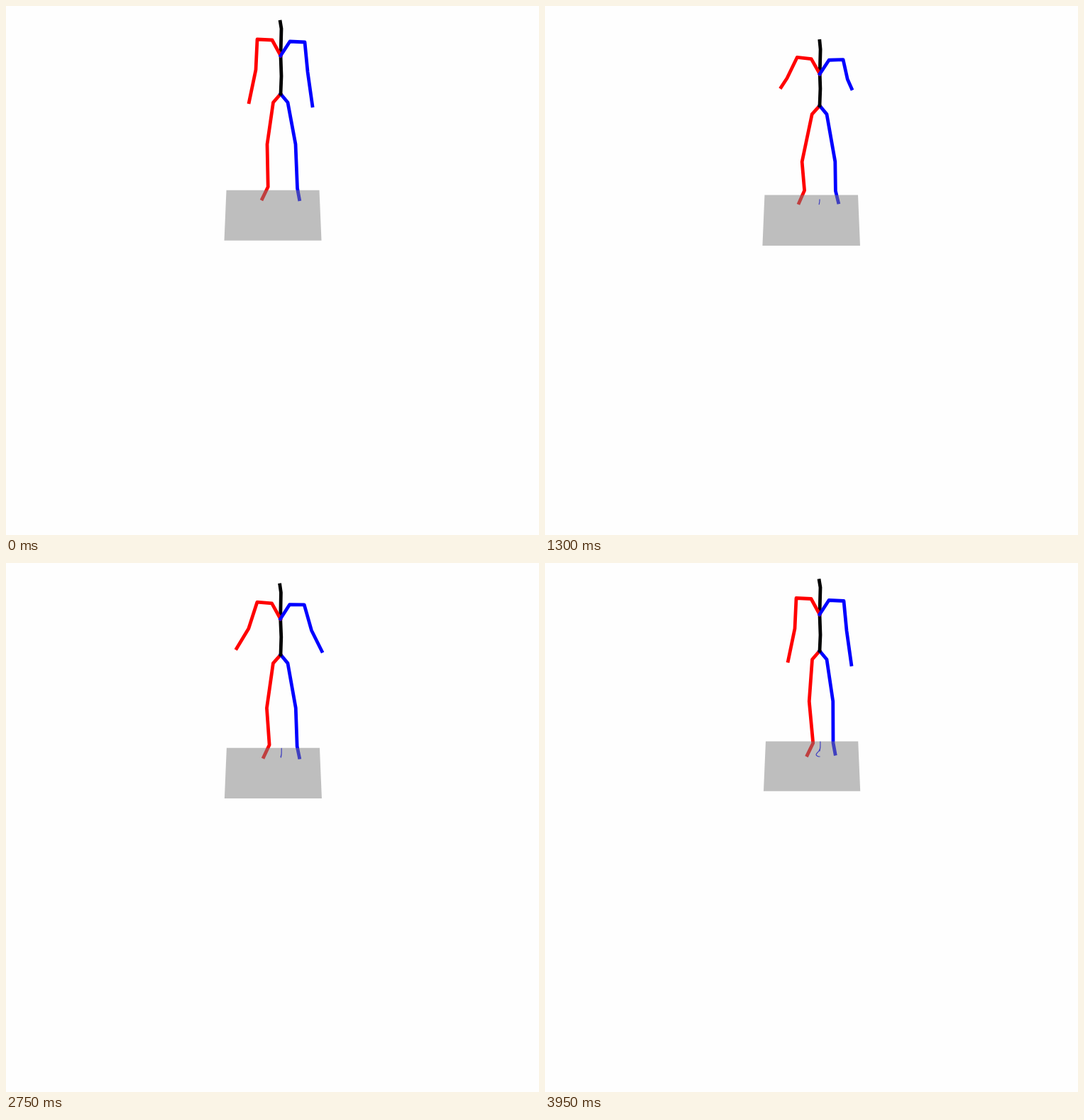
Animation of 751x746 px, one loop 4 s. Source, as an HTML page with a canvas:

```html
<!DOCTYPE html>
<html lang="en">
<head>
<meta charset="utf-8">
<title>Stick figure squat</title>
<style>
  html, body { margin: 0; width: 100%; height: 100%; overflow: hidden; background: #fefefe; }
  canvas { display: block; }
</style>
</head>
<body>
<canvas id="stage" width="751" height="746"></canvas>
<script>
const LOOP = 4000, STEP = 50;
const RED = '#f00', BLUE = '#00f', BLACK = '#000';
const ROOT = { x: 387, y: 273 };
const ctx = document.getElementById('stage').getContext('2d');

// Joints of each limb from the body outwards, standing and at the lowest point.
// bend: vertical bulge of each joint between the two; flare: sideways bulge.
const spine = {
  color: BLACK, flare: 0, bend: [0, -2, 4, 4, 0],
  stand: [[387, 124], [388, 99], [387, 70], [388, 32], [386.4, 22.3]],
  crouch: [[387, 207], [387.5, 195], [388, 182], [388.5, 159], [389.3, 157]]
};
const armBend = [3, 0, -13, -45], legBend = [0, 16, 2, 2];
const redArm = {
  color: RED, side: -1, flare: -11, bend: armBend,
  stand: [[375, 48], [354, 47], [352, 90], [342.5, 135.7]],
  crouch: [[376, 168], [360, 174], [345, 205], [341, 224.7]]
};
const blueArm = {
  color: BLUE, side: 1, flare: 0, bend: armBend,
  stand: [[400, 50], [421, 51], [425, 93], [431.7, 140.7]],
  crouch: [[400.5, 168], [416.5, 174], [431, 200], [433.6, 214.7]]
};
const redLeg = {
  color: RED, flare: -4, bend: legBend,
  stand: [[376.5, 136], [368, 195], [369.2, 255], [361, 272]],
  crouch: [[375, 219], [356, 249], [368.5, 272], [362.7, 291.8]]
};
const blueLeg = {
  color: BLUE, flare: 0, bend: legBend,
  stand: [[397, 136], [408, 195], [410.5, 257], [413.4, 272.7]],
  crouch: [[397, 219], [412, 248], [405, 267], [413, 285]]
};

const lerp = (a, b, k) => a + (b - a) * k;
const bump = (t, peak, width) => Math.exp(-(((t - peak) / width) ** 2));
function ease(t, from, to) {
  const s = Math.min(1, Math.max(0, (t - from) / (to - from)));
  return s * s * (3 - 2 * s);
}

// 0 standing, 1 lowest.
const depthAt = t => ease(t, 1070, 1870) * (1 - ease(t, 1827, 2919));

function pose(limb, t) {
  const d = depthAt(t);
  const bulge = 6.75 * d * (1 - d) ** 2;
  return limb.stand.map(([x, y], i) => {
    const [cx, cy] = limb.crouch[i];
    const flare = i === 1 && limb.bend === legBend || i > 1 ? limb.flare : 0;
    return [lerp(x, cx, d) + flare * bulge, lerp(y, cy, d) + limb.bend[i] * bulge];
  });
}

// The upper body leans aside after the rise, then settles a little lower.
function lean(joints, hipY, t) {
  const aside = -4.5 * bump(t, 3180, 320), sink = 2.5 * ease(t, 3350, 3900);
  return joints.map(([x, y]) => {
    const height = (hipY - y) / 104;
    return [x + aside * height, y + sink];
  });
}

// Both arms drift outwards, slightly at first and widely on the way up.
function arm(limb, hipY, t) {
  const joints = lean(pose(limb, t), hipY, t);
  const reach = 4 * bump(t, 600, 300) + 17 * bump(t, 2900, 300);
  const [, , elbow, hand] = joints;
  elbow[0] += limb.side * reach * 0.4;
  hand[0] += limb.side * reach;
  hand[1] -= reach * 0.3;
  return joints;
}

function leg(limb, t, dx, dy, from, to) {
  const k = ease(t, from, to);
  return pose(limb, t).map(([x, y], i) => {
    const share = Math.min(1, i / 2) * k;
    return [x + dx * share, i > 1 ? y + dy * k : y];
  });
}

function line(points, color, width) {
  ctx.beginPath();
  points.forEach(([x, y]) => ctx.lineTo(x, y));
  ctx.strokeStyle = color;
  ctx.lineWidth = width;
  ctx.stroke();
}

function drawFigure(t) {
  const bones = pose(spine, t);
  const hip = bones[0];
  const back = [hip, ...lean(bones.slice(1), hip[1], t)];
  const chest = back[2];
  line([hip, ...leg(redLeg, t, 8.5, -1, 2400, 3200)], RED, 4.8);
  line([hip, ...leg(blueLeg, t, -4.5, -3.5, 3300, 3950)], BLUE, 4.8);
  line(back, BLACK, 4.8);
  for (const limb of [redArm, blueArm]) line([chest, ...arm(limb, hip[1], t)], limb.color, 4.8);
}

// Centre and top edge of the floor, which slides under the fixed root.
function floorAt(t) {
  const x = 376 - 0.8 * ease(t, 700, 1300) + 0.9 * ease(t, 2400, 3900) + 5.4 * bump(t, 3080, 260);
  const top = 259.8 + 12.6 * ease(t, 700, 1860) - 20.9 * ease(t, 2000, 3400);
  return { x, top };
}

// Path of the root over the floor so far.
function drawTrail(t) {
  if (t < 2 * STEP) return;
  const now = floorAt(t);
  const points = [];
  for (let u = 0; u <= t; u += STEP) {
    const then = floorAt(u);
    points.push([ROOT.x + now.x - then.x, ROOT.y + now.top - then.top]);
  }
  line(points, BLUE, 1.2);
}

function drawFloor(t) {
  const { x, top } = floorAt(t);
  const near = top - 260;
  const back = 65.5 + near * 0.045, front = back + 3;
  const bottom = top + 71 + near * 0.08;
  ctx.beginPath();
  ctx.moveTo(x - back, top);
  ctx.lineTo(x + back, top);
  ctx.lineTo(x + front, bottom);
  ctx.lineTo(x - front, bottom);
  ctx.fillStyle = 'rgba(128, 128, 128, 0.5)';
  ctx.fill();
}

function draw(t) {
  ctx.fillStyle = '#fefefe';
  ctx.fillRect(0, 0, 751, 746);
  ctx.lineJoin = 'round';
  ctx.lineCap = 'square';
  drawTrail(t);
  drawFigure(t);
  drawFloor(t);
}

const start = performance.now();
function tick() {
  const t = (performance.now() - start) % LOOP;
  draw(Math.floor(t / STEP) * STEP);
  requestAnimationFrame(tick);
}
tick();
</script>
</body>
</html>
```
